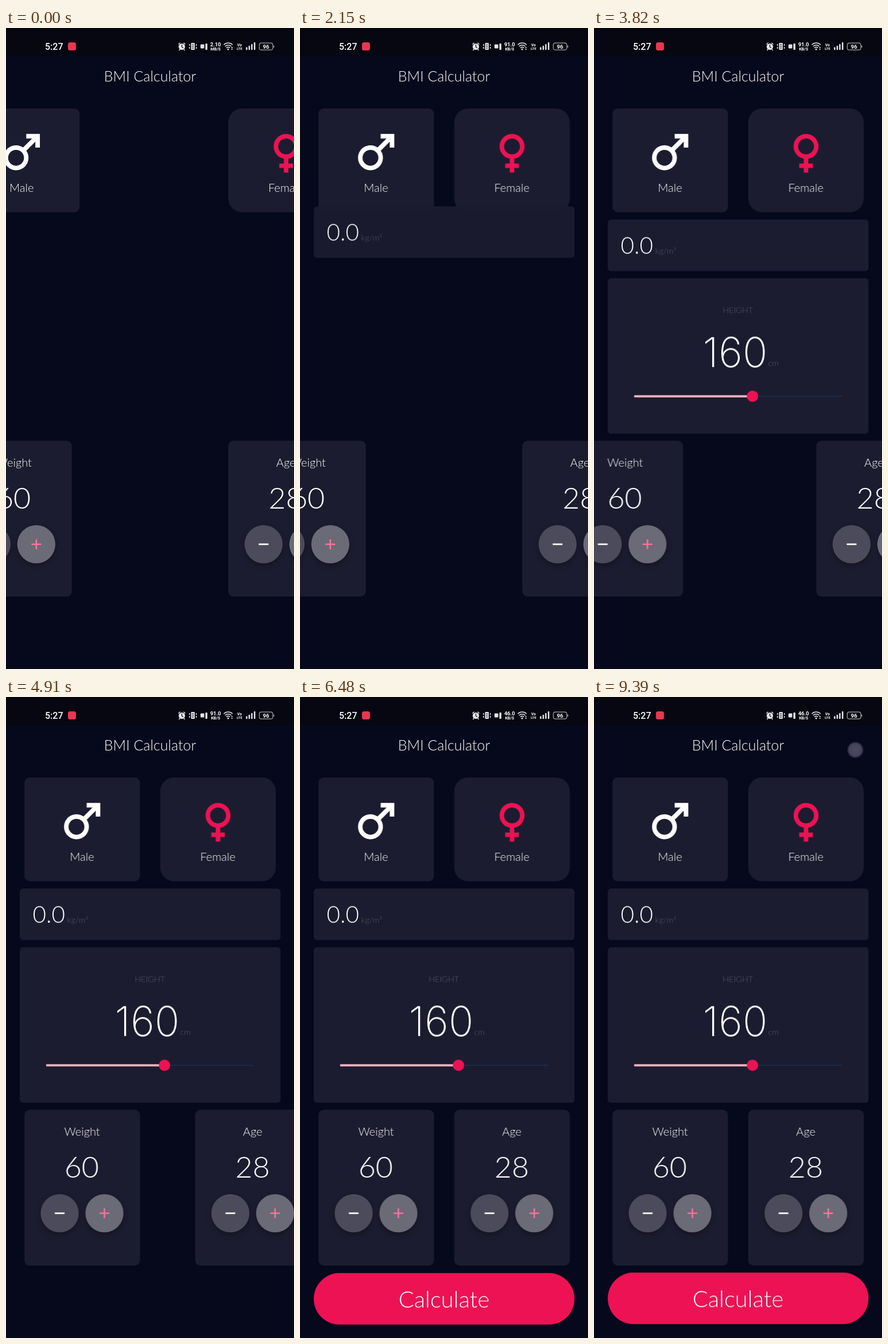
These frames come from a looping animation (502 by 1115 pixels, 9420 ms). An HTML page:

```html
<!DOCTYPE html>
<html lang="en">
<head>
<meta charset="utf-8">
<title>BMI Calculator</title>
<style>
  html, body { margin: 0; width: 100%; height: 100%; overflow: hidden; background: #06081c; }
  svg { display: block; width: 100vw; height: 100vh; }
  text { font-family: Lato, "Open Sans", sans-serif; font-weight: 300; fill: #fff; }
  .mid { text-anchor: middle; }
  .label { font-size: 20px; }
  .value { font-size: 52px; }
  .tall { font-family: Inter, "Open Sans", sans-serif; font-size: 72px; font-weight: 250; }
  .unit { font-size: 14.5px; fill: #555565; }
  .card { fill: #1c1c30; }
  .pink { fill: #ed1253; }
  .bar text { font-family: Roboto, sans-serif; font-weight: 700; }
  .button { filter: drop-shadow(0 4px 4px rgba(0, 0, 0, .3)); }

  .male, .female, .bmi, .height, .weight, .age, .calc, .rate, .touch {
    animation: 9420ms linear infinite;
  }
  .male { animation-name: male; }
  .female { animation-name: female; }
  .bmi { animation-name: bmi, bmi-fade; }
  .height { animation-name: height, height-fade; }
  .weight { animation-name: weight; }
  .age { animation-name: age; }
  .calc { animation-name: calc, calc-fade; }

  /* sideways slides */
  @keyframes male {
    0% { transform: translateX(-105.5px); animation-timing-function: cubic-bezier(.177, .293, .643, 1); }
    8.312%, 100% { transform: none; }
  }
  @keyframes female {
    0%, 6.656% { transform: translateX(118.7px); animation-timing-function: ease-out; }
    15.573%, 100% { transform: none; }
  }
  @keyframes weight {
    0%, 38.577% { transform: translateX(-118.7px); animation-timing-function: ease-out; }
    47.495%, 100% { transform: none; }
  }
  @keyframes age {
    0%, 49.161% { transform: translateX(118.7px); animation-timing-function: ease-out; }
    58.079%, 100% { transform: none; }
  }

  /* vertical slides with a shorter fade */
  @keyframes bmi {
    0%, 17.272% { transform: translateY(-118.7px); animation-timing-function: ease-out; }
    26.189%, 100% { transform: none; }
  }
  @keyframes bmi-fade { 0%, 17.272% { opacity: 0; } 23.068%, 100% { opacity: 1; } }
  @keyframes height {
    0%, 27.919% { transform: translateY(-118.7px); animation-timing-function: ease-out; }
    36.837%, 100% { transform: none; }
  }
  @keyframes height-fade { 0%, 27.919% { opacity: 0; } 33.715%, 100% { opacity: 1; } }
  @keyframes calc {
    0%, 60.425% { transform: translateY(118.7px); animation-timing-function: ease-out; }
    69.342%, 100% { transform: none; }
  }
  @keyframes calc-fade { 0%, 60.425% { opacity: 0; } 66.221%, 100% { opacity: 1; } }

  /* hard switches */
  .rate, .touch { animation-timing-function: step-end; }
  .rate.a { animation-name: rate-a; }
  .rate.b { animation-name: rate-b; }
  .rate.c { animation-name: rate-c; }
  .touch { animation-name: touch; }
  @keyframes rate-a { 0% { opacity: 1; } 17%, 100% { opacity: 0; } }
  @keyframes rate-b { 0% { opacity: 0; } 17% { opacity: 1; } 59%, 100% { opacity: 0; } }
  @keyframes rate-c { 0% { opacity: 0; } 59%, 100% { opacity: 1; } }
  @keyframes touch { 0% { opacity: 0; } 99%, 100% { opacity: 1; } }
</style>
</head>
<body>
<svg viewBox="0 0 502 1115" preserveAspectRatio="none">
  <defs>
    <g id="buttons">
      <g class="button">
        <circle cx="61.5" cy="180" r="33.2" fill="#4b4b5b"/>
        <circle cx="139.5" cy="180" r="33.2" fill="#6b6a77"/>
      </g>
      <path d="M53 180h17" stroke="#fff" stroke-width="2.7"/>
      <path d="M131 180h17M139.5 171.5v17" stroke="#fb739a" stroke-width="2.6"/>
    </g>
    <radialGradient id="glow">
      <stop offset="0" stop-color="#4b4a5e"/>
      <stop offset=".72" stop-color="#444357"/>
      <stop offset=".86" stop-color="#34344a" stop-opacity=".8"/>
      <stop offset="1" stop-color="#1c1c30" stop-opacity="0"/>
    </radialGradient>
  </defs>

  <rect width="502" height="1115" fill="#06081c"/>
  <rect width="502" height="49" fill="#060711"/>

  <text class="mid" x="251" y="93" font-size="25">BMI Calculator</text>

  <g class="male">
    <rect class="card" x="32" y="140" width="201.5" height="180.5" rx="9"/>
    <path transform="translate(85.2 168.4) scale(3.957)" fill="#fff" d="M9.5 11a3.5 3.5 0 1 1 0 7a3.5 3.5 0 1 1 0-7zM9.5 9a5.5 5.5 0 1 0 4.53 2.38L18 7.42V10h2V4h-6v2h2.58l-3.97 3.97A5.5 5.5 0 0 0 9.5 9z" fill-rule="evenodd"/>
    <text class="mid label" x="132.5" y="285">Male</text>
  </g>

  <g class="female">
    <rect class="card" x="268.8" y="140" width="201.5" height="180.5" rx="24"/>
    <path transform="translate(322.1 168.4) scale(3.957)" class="pink" d="M17.5 9.5a5.5 5.5 0 1 0-6.5 5.4V17H9v2h2v2h2v-2h2v-2h-2v-2.1A5.5 5.5 0 0 0 17.5 9.5zM8.5 9.5a3.5 3.5 0 1 1 7 0a3.5 3.5 0 1 1-7 0z" fill-rule="evenodd"/>
    <text class="mid label" x="369.2" y="285">Female</text>
  </g>

  <g class="bmi">
    <rect class="card" x="24" y="333" width="454.5" height="90" rx="6"/>
    <text x="46.5" y="393" font-size="40.5">0.0</text>
    <text class="unit" x="106.5" y="393">kg/m²</text>
  </g>

  <g class="height">
    <rect class="card" x="24" y="435" width="454.5" height="271" rx="6"/>
    <text class="mid unit" x="250.7" y="495.5">HEIGHT</text>
    <text class="mid tall" x="246" y="590">160</text>
    <text class="unit" x="303.5" y="588">cm</text>
    <path d="M276 640.5H432" stroke="#1a2e54" stroke-width="1.8"/>
    <path d="M71.5 640.5H276" stroke="#f6b6c5" stroke-width="3.8" stroke-linecap="round"/>
    <circle class="pink" cx="276.3" cy="640.5" r="9.8"/>
  </g>

  <g class="weight">
    <rect class="card" x="32" y="718" width="201.5" height="271" rx="9"/>
    <text class="mid label" x="132.5" y="763">Weight</text>
    <text class="mid value" x="131.8" y="836">60</text>
    <use href="#buttons" x="32" y="718"/>
  </g>

  <g class="age">
    <rect class="card" x="268.8" y="718" width="201.5" height="271" rx="9"/>
    <text class="mid label" x="369.2" y="763">Age</text>
    <text class="mid value" x="369" y="836">28</text>
    <use href="#buttons" x="268.8" y="718"/>
  </g>

  <g class="calc">
    <rect class="pink" x="24" y="1001" width="454.5" height="90" rx="45"/>
    <text class="mid" x="251" y="1061" font-size="40">Calculate</text>
  </g>

  <g class="bar">
    <text x="68" y="38" font-size="16" style="font-weight:500">5:27</text>
    <rect x="108" y="25" width="14" height="14" rx="3.5" fill="#e93650"/>

    <g fill="none" stroke="#e4e4e8" stroke-width="1.5">
      <circle cx="306.5" cy="32.5" r="5.6" fill="#e4e4e8" stroke="none"/>
      <path d="M300.5 28.5l3-2.7M312.5 28.5l-3-2.7M303 37l-1.5 2M310 37l1.5 2"/>
      <path d="M306.5 29v4l2.5 1.5" stroke="#060711" stroke-width="1.2"/>

      <rect x="322.5" y="26" width="6.5" height="12" rx="1" fill="#e4e4e8" stroke="none"/>
      <path d="M324 29h3.5M324 32h3.5M324 35h3.5" stroke="#060711" stroke-width="1"/>
      <path d="M319.8 28v8M331.7 28v8" stroke-dasharray="3 2"/>

      <rect x="339" y="28.5" width="6.5" height="7" rx="1" fill="#e4e4e8" stroke="none"/>
      <rect x="347.5" y="27" width="3.5" height="11" rx="1" fill="#e4e4e8" stroke="none"/>

      <path d="M379.5 29.2a11 11 0 0 1 15.5 0M381.8 32a7.7 7.7 0 0 1 10.9 0M384.2 34.6a4.4 4.4 0 0 1 6.1 0"/>
      <circle cx="387.2" cy="37" r="1.5" fill="#e4e4e8" stroke="none"/>
      <path d="M393.8 33v5" stroke-width="1.7" stroke-dasharray="2 1"/>

      <path d="M419.5 37v-2.5M424 37v-5M428.5 37v-8M433.3 37v-11" stroke-width="2.5" stroke-linecap="round"/>
      <rect x="441.5" y="26.2" width="23.5" height="12" rx="3.5" stroke="#a5a5ad" stroke-width="1.2"/>
      <path d="M466.7 30.5v3.5" stroke="#a5a5ad"/>
    </g>
    <text class="mid" x="453.3" y="35.7" font-size="9.5">96</text>
    <g class="mid">
      <text x="407" y="31.5" font-size="6.5">Vo</text>
      <text x="407" y="38.3" font-size="6">LTE</text>
      <g class="rate a"><text x="365.3" y="32" font-size="9.3">2.10</text><text x="365.3" y="39.3" font-size="7">MB/S</text></g>
      <g class="rate b"><text x="365.3" y="32" font-size="9.3">91.0</text><text x="365.3" y="39.3" font-size="7">KB/S</text></g>
      <g class="rate c"><text x="365.3" y="32" font-size="9.3">46.0</text><text x="365.3" y="39.3" font-size="7">KB/S</text></g>
    </g>
  </g>

  <circle class="touch" cx="455.5" cy="92" r="15" fill="url(#glow)"/>
</svg>
</body>
</html>
```
